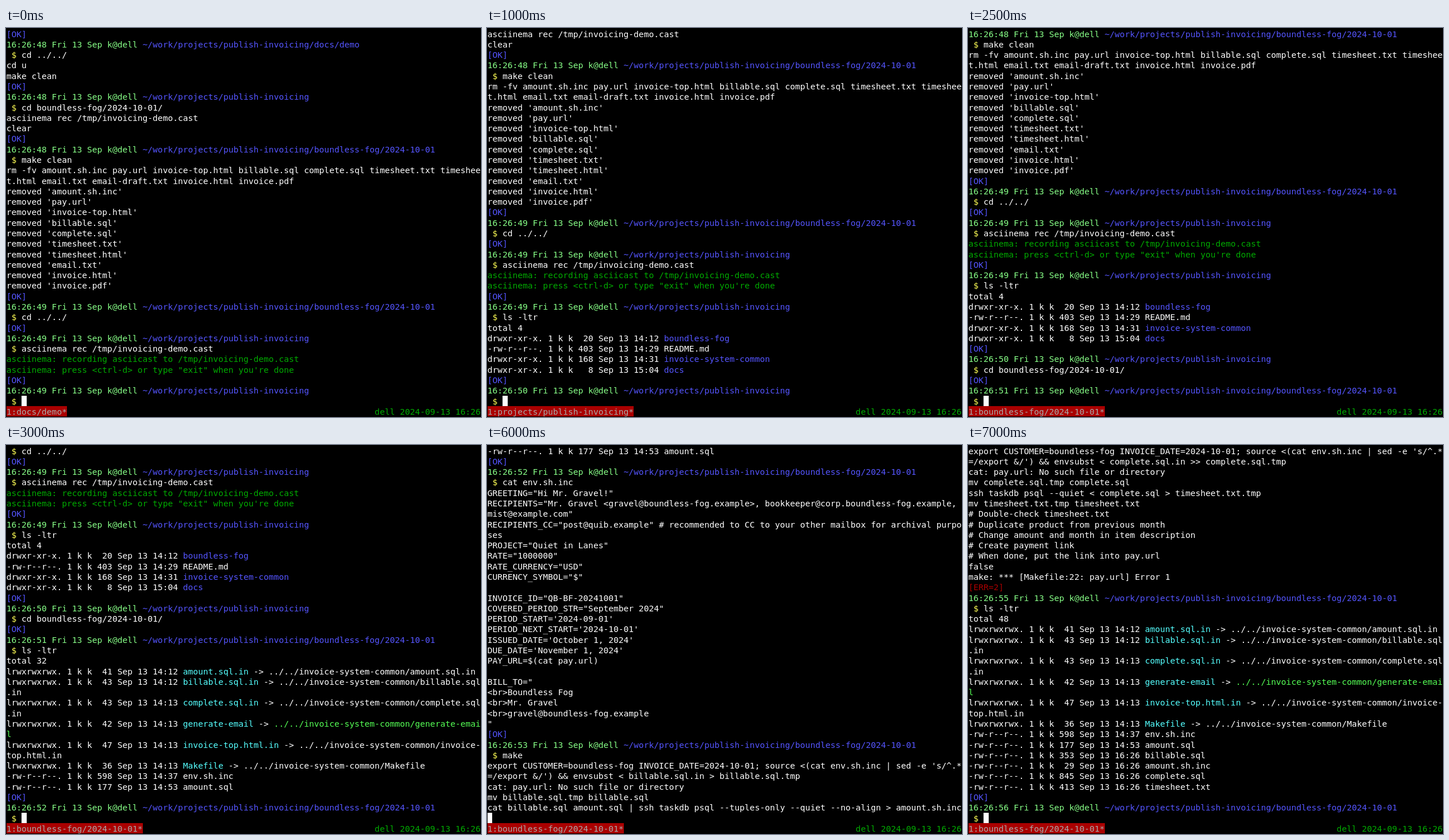
Recreate the animation shown at these times as an HTML page with a canvas. Size 826x678 px, loop 8000 ms.

```html
<!DOCTYPE html>
<html lang="en">
<head>
<meta charset="utf-8">
<title>Terminal session</title>
<style>
html, body { margin: 0; width: 100%; height: 100%; overflow: hidden; background: #000; }
canvas { display: block; }
</style>
</head>
<body>
<canvas id="stage" width="826" height="678"></canvas>
<script>
const COLS = 94, ROWS = 37, LOOP = 8000, INSET = 0.65;
const canvas = document.getElementById("stage");
const ctx = canvas.getContext("2d");
const cellW = (canvas.width - 2 * INSET) / COLS;
const cellH = (canvas.height - 2 * INSET) / ROWS;
const baseline = cellH * 13 / 16;
const left = col => INSET + col * cellW;
const top_ = row => INSET + row * cellH;

// Colour codes: a § followed by a letter switches the text colour.
const COLORS = {
  w: "#ffffff", b: "#5555ff", p: "#87ff87", g: "#55ff55", c: "#55ffff",
  y: "#ffff55", d: "#00aa00", r: "#aa0000", s: "#aaaaaa"
};

const CLIENT = "boundless-fog";
const JOB = `${CLIENT}/2024-10-01`;
const SHARED = "../../invoice-system-common/";

const log = [], screens = [];

function parse(text) {
  const cells = [];
  let color = "w";
  for (let i = 0; i < text.length; i++) {
    if (text[i] === "§") color = text[++i];
    else cells.push([text[i], COLORS[color]]);
  }
  return cells;
}

function print(text) {
  for (const line of text.split("\n")) {
    const cells = parse(line);
    do log.push(cells.splice(0, COLS)); while (cells.length);
  }
}

function prompt(second, dir = "", result = "§b[OK]") {
  print(`${result}\n§p16:26:${second} Fri 13 Sep k@dell §b~/work/projects/publish-invoicing${dir}\n§y $ `);
}

function run(command) {
  log[log.length - 1].push(...parse(command));
}

function show(at, title) {
  screens.push({ at, title, rows: log.slice(1 - ROWS).map(row => [...row]) });
}

function entry(mode, size, time, name) {
  print(`${mode}. 1 k k ${String(size).padStart(3)} Sep 13 ${time} ${name}`);
}

const dir = (size, time, name) => entry("drwxr-xr-x", size, time, "§b" + name);
const file = (size, time, name) => entry("-rw-r--r--", size, time, name);
const link = (size, time, name, color = "w") =>
  entry("lrwxrwxrwx", size, time, `§c${name}§w -> §${color}${SHARED}${name}`);

function listJob(total) {
  run("ls -ltr");
  print(`total ${total}`);
  link(41, "14:12", "amount.sql.in");
  link(43, "14:12", "billable.sql.in");
  link(43, "14:13", "complete.sql.in");
  link(42, "14:13", "generate-email", "g");
  link(47, "14:13", "invoice-top.html.in");
  link(36, "14:13", "Makefile");
  file(598, "14:37", "env.sh.inc");
  file(177, "14:53", "amount.sql");
}

function substitute(name, redirect) {
  print(`export CUSTOMER=${CLIENT} INVOICE_DATE=2024-10-01; source <(cat env.sh.inc | sed -e 's/^.*=/export &/') && envsubst < ${name}.in ${redirect} ${name}.tmp
cat: pay.url: No such file or directory
mv ${name}.tmp ${name}`);
}

function buildSession() {
  const jobPath = "/" + JOB;
  const record = "asciinema rec /tmp/invoicing-demo.cast";
  const commonTitle = "projects/publish-invoicing";

  prompt(48, "/docs/demo");
  run("cd ../../");
  print("cd u\nmake clean");
  prompt(48);
  run(`cd ${JOB}/`);
  print(`${record}\nclear`);
  prompt(48, jobPath);
  run("make clean");
  print("rm -fv amount.sh.inc pay.url invoice-top.html billable.sql complete.sql timesheet.txt timesheet.html email.txt email-draft.txt invoice.html invoice.pdf");
  const removed = "amount.sh.inc pay.url invoice-top.html billable.sql complete.sql timesheet.txt timesheet.html email.txt invoice.html invoice.pdf";
  for (const name of removed.split(" ")) print(`removed '${name}'`);
  prompt(49, jobPath);
  run("cd ../../");
  prompt(49);
  run(record);
  print("§dasciinema: recording asciicast to /tmp/invoicing-demo.cast");
  print("§dasciinema: press <ctrl-d> or type \"exit\" when you're done");
  prompt(49);
  show(0, "docs/demo");
  show(500, commonTitle);

  run("ls -ltr");
  print("total 4");
  dir(20, "14:12", CLIENT);
  file(403, "14:29", "README.md");
  dir(168, "14:31", "invoice-system-common");
  dir(8, "15:04", "docs");
  prompt(50);
  show(1000, commonTitle);

  run(`cd ${JOB}/`);
  prompt(51, jobPath);
  show(2000, commonTitle);
  show(2500, JOB);

  listJob(32);
  prompt(52, jobPath);
  show(3000, JOB);

  run("cat env.sh.inc");
  print(`GREETING="Hi Mr. Gravel!"
RECIPIENTS="Mr. Gravel <gravel@${CLIENT}.example>, bookkeeper@corp.${CLIENT}.example, mist@example.com"
RECIPIENTS_CC="post@quib.example" # recommended to CC to your other mailbox for archival purposes
PROJECT="Quiet in Lanes"
RATE="1000000"
RATE_CURRENCY="USD"
CURRENCY_SYMBOL="$"

INVOICE_ID="QB-BF-20241001"
COVERED_PERIOD_STR="September 2024"
PERIOD_START='2024-09-01'
PERIOD_NEXT_START='2024-10-01'
ISSUED_DATE='October 1, 2024'
DUE_DATE='November 1, 2024'
PAY_URL=$(cat pay.url)

BILL_TO="
<br>Boundless Fog
<br>Mr. Gravel
<br>gravel@${CLIENT}.example
"`);
  prompt(53, jobPath);
  show(4000, JOB);

  run("make");
  substitute("billable.sql", ">");
  print("cat billable.sql amount.sql | ssh taskdb psql --tuples-only --quiet --no-align > amount.sh.inc\n");
  show(6000, JOB);

  run("cp billable.sql complete.sql.tmp");
  substitute("complete.sql", ">>");
  print(`ssh taskdb psql --quiet < complete.sql > timesheet.txt.tmp
mv timesheet.txt.tmp timesheet.txt
# Double-check timesheet.txt
# Duplicate product from previous month
# Change amount and month in item description
# Create payment link
# When done, put the link into pay.url
false
make: *** [Makefile:22: pay.url] Error 1`);
  prompt(55, jobPath, "§r[ERR=2]");
  show(6500, JOB);

  listJob(48);
  file(353, "16:26", "billable.sql");
  file(29, "16:26", "amount.sh.inc");
  file(845, "16:26", "complete.sql");
  file(413, "16:26", "timesheet.txt");
  prompt(56, jobPath);
  show(7000, JOB);
}

function drawRow(cells, row, col = 0) {
  cells.forEach(([char, color], i) => {
    if (char === " ") return;
    ctx.fillStyle = color;
    ctx.fillText(char, left(col + i), top_(row) + baseline);
  });
}

function fillCells(color, col, row, count) {
  const x = Math.round(left(col)), y = Math.round(top_(row));
  ctx.fillStyle = color;
  ctx.fillRect(x, y, Math.round(left(col + count)) - x, Math.round(top_(row + 1)) - y);
}

function draw({ rows, title }) {
  ctx.fillStyle = "#000";
  ctx.fillRect(0, 0, canvas.width, canvas.height);
  ctx.font = '14.6px "DejaVu Sans Mono", monospace';
  rows.forEach((cells, row) => drawRow(cells, row));
  fillCells("#fff", rows[rows.length - 1].length, rows.length - 1, 1);

  const tab = parse(`§s1:${title}*`), clock = parse("§ddell 2024-09-13 16:26");
  fillCells(COLORS.r, 0, ROWS - 1, tab.length);
  drawRow(tab, ROWS - 1);
  drawRow(clock, ROWS - 1, COLS - clock.length);
}

let current;
const start = performance.now();

function tick() {
  const time = (performance.now() - start) % LOOP;
  const screen = screens.filter(s => s.at <= time).pop();
  if (screen !== current) draw(current = screen);
  requestAnimationFrame(tick);
}

buildSession();
tick();
</script>
</body>
</html>
```
